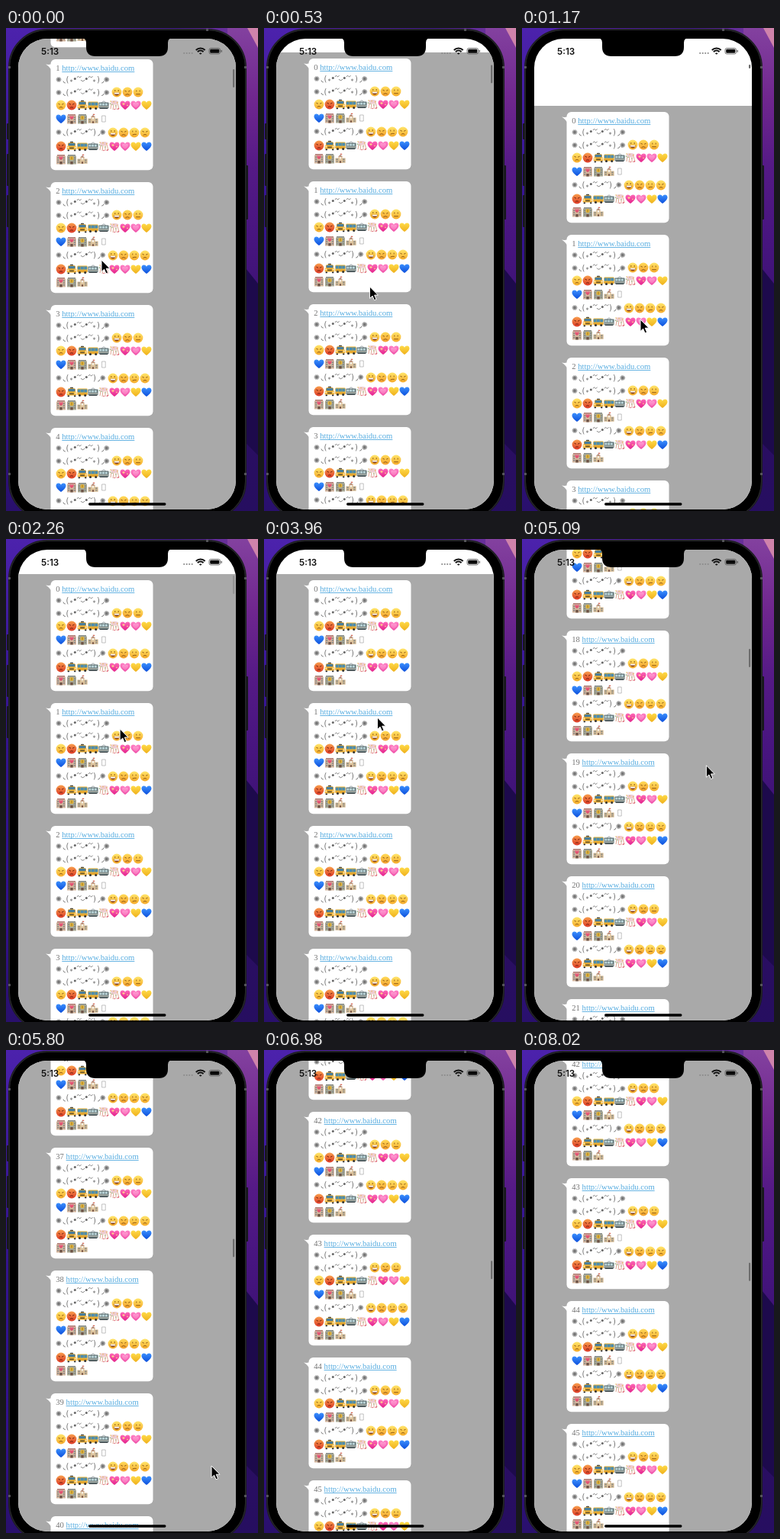
An HTML page with a canvas that plays this animation: 330 by 633 pixels, repeating every 8120 ms.

```html
<!DOCTYPE html>
<html lang="en">
<head>
<meta charset="utf-8">
<title>Chat list scrolling</title>
<style>
html, body { margin: 0; width: 100%; height: 100%; overflow: hidden; background: #2a1080; }
canvas { display: block; width: 330px; height: 633px; }
</style>
</head>
<body>
<canvas id="stage" width="330" height="633"></canvas>
<script>
const c = document.getElementById('stage').getContext('2d');
const LOOP = 8120, PITCH = 161, REST = 54, LINK = '#56ace0';
const clamp = v => Math.max(0, Math.min(1, v));

// Screen updates come in uneven bursts: [first, last, count]
const bursts = [[0, 0, 1], [200, 1170, 7], [1410, 2310, 11], [2610, 3570, 3], [3960, 3960, 1],
  [3980, 4590, 13], [4830, 4830, 1], [5090, 5530, 3], [5800, 5800, 1], [6070, 6280, 2],
  [6570, 6980, 3], [7250, 7490, 2], [7820, 8020, 2]];
const ticks = bursts.flatMap(([a, b, n]) =>
  Array.from({ length: n }, (_, i) => n > 1 ? a + (b - a) * i / (n - 1) : a));

// Top of the first bubble
function listTop(t) {
  if (t < 1410) return -120 + 230 * (1 - (1 - clamp(t / 1170)) ** 2);
  if (t < 2310) return REST + 56 * Math.exp(-(t - 1320) / 180);
  if (t < 3960) return REST;
  if (t < 4590) return REST - 915 * ((t - 3960) / 630) ** 2;
  if (t < 5090) return -861 - 1916 * (t - 4590) / 500;
  return -6765.3 + 936.3 * Math.exp(-(t - 5800) / 490);
}

const cursorPath = [[0, 125, 304], [1170, 155, 382], [1410, 155, 382], [2310, 148.5, 234], [3960, 148.5, 234],
  [4590, 225, 150], [4830, 225, 150], [5530, 269, 545], [5800, 269, 545], [6070, 297, 590], [6280, 297, 590]];
function cursorAt(t) {
  const i = cursorPath.findIndex(k => k[0] > t);
  if (i < 0) return null;
  const [a, b] = [cursorPath[i - 1], cursorPath[i]], p = (t - a[0]) / (b[0] - a[0]);
  return [a[1] + (b[1] - a[1]) * p, a[2] + (b[2] - a[2]) * p];
}

function box(x, y, w, h, r, fill, stroke, width = 1) {
  c.beginPath();
  c.roundRect(x, y, w, h, r);
  if (fill) { c.fillStyle = fill; c.fill(); }
  if (stroke) { c.strokeStyle = stroke; c.lineWidth = width; c.stroke(); }
}
function dot(x, y, r, fill) {
  c.beginPath();
  c.arc(x, y, r, 0, 7);
  c.fillStyle = fill;
  c.fill();
}
function shape(d, fill, stroke, width = 1) {
  const path = new Path2D(d);
  if (fill) { c.fillStyle = fill; c.fill(path); }
  if (stroke) { c.strokeStyle = stroke; c.lineWidth = width; c.stroke(path); }
}
function text(s, x, y, font, fill, align = 'left') {
  c.font = font;
  c.fillStyle = fill;
  c.textAlign = align;
  c.fillText(s, x, y);
}
function blend(x0, y0, x1, y1, ...colors) {
  const g = c.createLinearGradient(x0, y0, x1, y1);
  colors.forEach((color, i) => g.addColorStop(i / (colors.length - 1), color));
  return g;
}

function face(features, top = '#ffe368', bottom = '#f6ad2c', ink = '#85510f') {
  dot(0, 0, 6.4, blend(0, -6, 0, 6, top, bottom));
  shape(features, null, ink, 0.9);
}
function heart(top, bottom, extra) {
  shape('M0 6C-3 4-6.5 1-6.5-2.2C-6.5-6.2-1.5-6.8 0-3.3C1.5-6.8 6.5-6.2 6.5-2.2C6.5 1 3 4 0 6Z',
    blend(0, -6, 0, 6, top, bottom));
  if (extra) extra();
}
function building(wall, roof, sign) {
  box(-6, -4.5, 12, 11, 0.5, wall);
  box(-5, -6, 10, 1.8, 0, roof);
  for (const x of [-4.8, 2.8]) for (const y of [-2.5, 0.2, 3]) box(x, y, 2, 1.6, 0, '#7d8588');
  box(-1.7, 3, 3.4, 3.5, 0, '#6d5346');
  sign();
}
const emoji = {
  grin() {
    face('M-2.2-3v2M2.2-3v2');
    shape('M-3.8 .8H3.8Q3.2 4.6 0 4.6T-3.8 .8Z', '#8a431a');
    box(-3.2, 0.8, 6.4, 1.6, 0.5, '#fff');
  },
  upset() { face('M-3.6-1.8l2.4 1M3.6-1.8l-2.4 1M-2.6 3.6Q0 1.6 2.6 3.6', '#ffd956', '#f3a030'); },
  flat() { face('M-2.2-2.4v1.8M2.2-2.4v1.8M-2.8 2.7H2.8'); },
  confused() { face('M-2.2-2.4v1.8M2.2-2.4v1.8M-2.4 3.2Q0 1.8 2.8 2.4'); },
  tired() { face('M-3.6-1.8l2.4 1M3.6-1.8l-2.4 1M-2.2 3.4Q0 1.4 2.2 3.4'); },
  angry() { face('M-3.6-2l2.6 1.3M3.6-2l-2.6 1.3M-2 3.4Q0 2 2 3.4', '#f79a4b', '#dd3d28', '#6d1c0c'); },
  taxi() {
    box(-2, -6.3, 4, 2, 0.6, '#4a4a40');
    box(-5, -4.8, 10, 5, 1.6, '#e0a32c');
    box(-4.3, -4, 8.6, 3.6, 0.8, '#477d9c');
    box(-6.3, -0.4, 12.6, 5, 1.4, '#efb033');
    box(-2.8, 1.6, 5.6, 1.6, 0.4, '#66562f');
    dot(-4.7, 1.6, 1, '#fff4c8');
    dot(4.7, 1.6, 1, '#fff4c8');
    box(-5.4, 4.4, 2.4, 1.8, 0.4, '#2b2b2b');
    box(3, 4.4, 2.4, 1.8, 0.4, '#2b2b2b');
  },
  bus() {
    box(-6.7, -4.6, 13.4, 9, 1.3, '#f0b432');
    box(-6.2, -3.4, 12.4, 3.8, 0.5, '#4a8cb0');
    for (const x of [-2.8, 1.8]) box(x, -3.4, 0.5, 3.8, 0, '#d9a936');
    box(-6.7, 2.4, 13.4, 0.7, 0, '#c9842a');
    dot(-3.5, 4.4, 1.5, '#333');
    dot(3.7, 4.4, 1.5, '#333');
  },
  tram() {
    shape('M-3-3.2L0-5.2L3-3.2', null, '#78858a', 0.7);
    box(-6.6, -3.4, 13.2, 7.4, 0.8, '#66787b');
    for (const x of [-5.6, -1.9, 1.8]) box(x, -2.2, 3, 2.8, 0.3, '#bcd6da');
    box(-6.6, 1.6, 13.2, 1, 0, '#c9c8bc');
    box(-5.4, 4, 10.8, 1.1, 0, '#3c4447');
  },
  confetti() {
    shape('M-5-5Q0-7 5-5Q6-1 1-1Q-5 0-5-5Z', '#eecbd0');
    shape('M-4-2L-5 5M-1-1L-2 6M2-1L2 6M4-2L6 5', null, '#e0a894');
    for (let i = 0; i < 9; i++) {
      dot(5.5 * Math.sin(i * 2.4), 5.5 * Math.cos(i * 4.1), 0.8, ['#dd566b', '#e8b955', '#94b883'][i % 3]);
    }
  },
  sparkle() {
    heart('#ff6bb8', '#e3228b', () => shape(
      'M-2-3.6l.6 1.6l1.6.6l-1.6.6l-.6 1.6l-.6-1.6l-1.6-.6l1.6-.6ZM3-1l.4 1l1 .4l-1 .4l-.4 1l-.4-1l-1-.4l1-.4Z', '#ffd98a'));
  },
  pink() {
    heart('#ff82c6', '#ef4fa8', () => { c.save(); c.scale(0.6, 0.6); heart('#ff9dd3', '#f873bb'); c.restore(); });
  },
  yellow() { heart('#ffdc4a', '#efb01c'); },
  blue() { heart('#3d92ff', '#0d50dc'); },
  hotel() {
    building('#d2b49c', '#b5817a', () => { c.save(); c.translate(0, -1.5); c.scale(0.42, 0.42); heart('#ee6a86', '#d93f62'); c.restore(); });
  },
  bank() {
    building('#aaa994', '#8a8f88', () => { dot(0, -1.5, 2.6, '#e3b63c'); shape('M0-3.2V.2', null, '#946f22', 0.9); });
  },
  school() {
    box(-6.6, -0.6, 13.2, 6.4, 0, '#d3b78f');
    box(-2.5, -2.6, 5, 8.4, 0, '#dec6a0');
    shape('M-3.2-2.4L0-4.4L3.2-2.4Z', '#a8705a');
    shape('M0-4.2V-6.2', null, '#888', 0.6);
    box(0, -6.2, 2.2, 1.3, 0, '#d8604e');
    for (const x of [-5.4, 3.4]) for (const y of [0.6, 3.2]) box(x, y, 2, 1.4, 0, '#7b8486');
    box(-1.1, 3.2, 2.2, 2.6, 0, '#785444');
    dot(0, -0.6, 1.1, '#fff');
  }
};
const feelings = 'grin upset flat tired angry taxi bus tram confetti sparkle pink yellow blue hotel bank school'.split(' ');
// [x, y, first, end] runs of the same emoji sequence
const rows = [[145, 43, 0, 3], [72, 60, 3, 12], [72, 78, 12, 16], [140, 96, 0, 4], [72, 114, 4, 13], [72, 131, 13, 16]];

function kaomoji(y, short) {
  const ink = '#747474', shift = short ? -5 : 0;
  const glyph = (s, x, dy, size) => text(s, x, y + dy, size + 'px "DejaVu Sans", sans-serif', ink, 'center');
  glyph('✺', 69.3, 3.2, 9.5);
  glyph('✺', 132 + shift, 3.2, 9.5);
  glyph('(', 80.5, 3, 10);
  glyph(')', 121 + shift, 3, 10);
  glyph('∗', 85.5, 2.5, 6);
  if (!short) glyph('∗', 115.5, 2.5, 6);
  c.save();
  c.translate(0, y);
  for (const x of [90, 105]) {
    dot(x + 0.3, -1.5, 1.5, '#666');
    shape(`M${x + 3}-3q1.5-3 2.5-.8t3-1`, null, ink, 0.9);
  }
  shape('M98 0q2.5 3.5 5 0', null, ink, 0.9);
  shape(`M75 1.5q.3 2.6 2.8 2.6M${128 + shift} 1.5q-.3 2.6-2.8 2.6`, null, ink, 0.9);
  c.restore();
}

function bubble(index, y, pressed) {
  c.save();
  c.translate(0, y);
  shape('M52 6.5Q56 7.5 60 6V15Q57.5 10 52 6.5Z', '#fff');
  box(58.5, 0, 134, 145.3, 6, '#fff');
  const font = '10.65px "Liberation Serif", "Times New Roman", serif', label = index + ' ', url = 'http://www.baidu.com';
  const color = pressed ? '#9a9ab0' : LINK;
  text(label, 65.3, 15, font, '#747474');
  const x = 65.3 + c.measureText(label).width;
  text(url, x, 15, font, color);
  c.fillStyle = color;
  c.fillRect(x, 16, c.measureText(url).width, 0.9);
  kaomoji(27, false);
  kaomoji(43.5, false);
  kaomoji(96, true);
  box(125.6, 74, 4.6, 8, 0, null, '#a8a8a8', 0.7);
  for (const [left, top, first, end] of rows) {
    for (let i = first; i < end; i++) {
      c.save();
      c.translate(left + (i - first) * 14, top);
      const name = top === 96 && i === 2 ? 'confused' : feelings[i];
      emoji[name]();
      c.restore();
    }
  }
  c.restore();
}

function wallpaperAndPhone() {
  c.fillStyle = blend(0, 0, 330, 0, '#4a20ac', '#5422a2', '#451d90', '#7c3a9e');
  c.fillRect(0, 0, 330, 60);
  c.fillStyle = blend(0, 0, 0, 633, '#4c22ac', '#3d1a9c', '#34148c', '#321290', '#33108c', '#29106c');
  c.fillRect(0, 0, 40, 633);
  c.fillStyle = blend(0, 0, 0, 633, '#83419f', '#70278f', '#551a86', '#481580', '#3c1274', '#2c0f60', '#2a0e62', '#260e60');
  c.fillRect(290, 0, 40, 633);
  shape('M316 0H330V26Z', '#cf83ab');
  shape('M310 310L330 335V560L310 540Z', '#1d0a4c');
  for (const [x, y, h] of [[1, 125, 21], [1, 165, 42], [1, 219, 42], [313.5, 180, 71]]) box(x, y, 3.5, h, 1, '#17171c');
  box(4, 2, 310, 642, 50, '#000', '#1c1c20', 2);
  box(4.5, 2.5, 309, 641, 49.5, null, '#2e2e33', 0.8);
  c.fillStyle = '#55555a';
  for (const x of [3, 312]) for (const y of [50, 583]) c.fillRect(x, y, 3, 3);
  c.fillRect(262, 1, 3, 3);
}

function statusBar() {
  text('5:13', 46, 35, '600 11.7px Inter, sans-serif', '#111');
  for (let i = 0; i < 4; i++) dot(233.2 + i * 3.5, 33, 1.1, '#8b8b8b');
  c.lineCap = 'butt';
  for (const r of [9, 6, 2.2]) {
    c.beginPath();
    c.arc(254.7, 35, r - 0.6, -Math.PI * 0.75, -Math.PI * 0.25);
    c.strokeStyle = '#111';
    c.lineWidth = 2;
    c.stroke();
  }
  box(266, 26.5, 14.5, 7.5, 2.2, null, '#555', 0.8);
  box(267.2, 27.7, 12.1, 5.1, 1.2, '#0a0a0a');
  box(281.6, 28.8, 1.2, 3, 0.6, '#555');
}

function draw(t) {
  const top = Math.round(listTop(t)), scrolled = REST - top;
  wallpaperAndPhone();
  c.save();
  box(16, 14, 285, 617, 38, '#fff');
  c.clip();
  c.fillStyle = '#a9a9a9';
  c.fillRect(16, top - 8, 285, 8000);
  const pressed = t >= 2610 && t < 3090 || t >= 3570 && t < 3960;
  for (let i = Math.max(0, Math.floor((14 - top) / PITCH)); top + i * PITCH < 633; i++) {
    bubble(i, top + i * PITCH, pressed && i === 1);
  }
  const barAlpha = t < 3960 ? clamp((2310 - t) / 250) : t > 3960 ? 1 : 0;
  c.globalAlpha = barAlpha;
  box(297, 48 + Math.max(0, scrolled) * 0.0339, 2.2, Math.max(5, 24 + Math.min(0, scrolled)), 1.1, '#6c6c6c');
  c.globalAlpha = 1;
  statusBar();
  shape('M100 13Q105 14 105 19V25Q105 37 117 37H200Q212 37 212 25V19Q212 14 217 13Z', '#000');
  box(108, 622.3, 101.5, 3.4, 1.7, '#000');
  c.restore();

  const cursor = cursorAt(t);
  if (!cursor) return;
  c.save();
  c.translate(...cursor);
  shape('M0 0V15.5L3.6 12.2L6 17.8L8.6 16.7L6.2 11.2H11Z', '#000', '#fff', 1);
  c.restore();
}

let shown = -1;
function frame(now) {
  const t = now % LOOP, tick = ticks.findLast(k => k <= t);
  if (tick !== shown) draw(shown = tick);
  requestAnimationFrame(frame);
}
frame(0);
</script>
</body>
</html>
```
